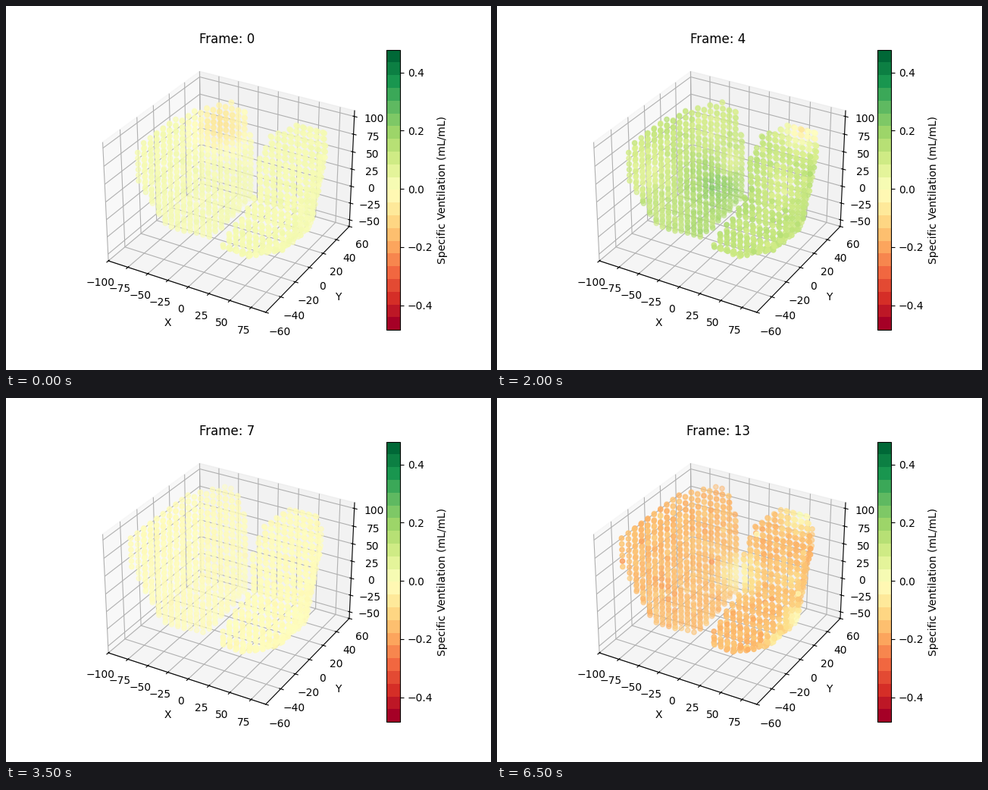
A matplotlib script for the animation above (7 s loop, 640 px wide and 480 px high).

```python
import numpy as np
import matplotlib.pyplot as plt
from matplotlib.animation import FuncAnimation
from matplotlib.cm import ScalarMappable
from matplotlib.colors import Normalize
from matplotlib.path import Path
from mpl_toolkits.mplot3d import proj3d

FRAMES, STEP = 14, 500
HALF = FRAMES // 2
VMIN, VMAX = -0.4844, 0.4781
LAYERS = 2

# Key points of the lung outlines, in pixels from the top left
LEFT = [(170, 189), (216, 154), (249, 135), (297, 124), (315, 136),
        (325, 180), (325, 252), (268, 310), (212, 292), (171, 224)]
RIGHT = [(348, 172), (383, 154), (420, 162), (424, 190), (402, 292),
         (367, 322), (320, 331), (283, 317), (328, 250), (330, 212)]

# Regions that differ from the mean: x, y, radius, amount
INHALE = [(290, 238, 38, .14), (265, 298, 22, .06), (405, 160, 28, -.27),
          (378, 238, 22, -.07), (308, 205, 16, -.14), (198, 212, 32, -.08)]
EXHALE = [(322, 232, 24, .15), (396, 292, 18, .15), (402, 153, 22, .17),
          (370, 322, 14, .14), (385, 240, 20, .06)]

fig = plt.figure(figsize=(6.4, 4.8), dpi=100)
ax = fig.add_subplot(projection="3d")
limits = dict(xlim=(-100, 92), ylim=(-60, 60), zlim=(-60, 108))
ax.set(xlabel="X", ylabel="Y", **limits)
ax.set_xticks(np.arange(-100, 76, 25))
ax.set_yticks(np.arange(-60, 61, 20))
ax.set_zticks(np.arange(-50, 101, 25))
bands = ScalarMappable(Normalize(VMIN, VMAX), plt.get_cmap("RdYlGn", 22))
fig.colorbar(bands, ax=ax, label="Specific Ventilation (mL/mL)")
fig.canvas.draw()


def to_stage(x, y, z):
    """Pixel position of 3D points."""
    u, v, _ = proj3d.proj_transform(x, y, z, ax.get_proj())
    px = ax.transData.transform(np.column_stack([u, v]))
    return px * (1, -1) + (0, 480)


def facing(solid):
    """Keep the few voxel layers that are nearest to the viewer."""
    buried = np.zeros_like(solid)
    k = LAYERS
    buried[:-k, k:, :-k] = solid[k:, :-k, k:]
    return solid & ~buried


def voxels(stretch, shift):
    x, y, z = np.meshgrid(np.arange(-92, 85, 8), np.arange(-52, 53, 8),
                          np.arange(-52, 93, 8), indexing="ij")
    px = to_stage(x.ravel(), y.ravel(), z.ravel())

    def inside(outline):
        shape = (np.array(outline) - (0, 255)) * (1, stretch) + (shift, 255)
        return Path(shape).contains_points(px).reshape(x.shape)

    slope = .35 + .006 * np.maximum(0, z + 20)
    left = inside(LEFT) & (x <= -12) & (y >= -38 + slope * (x + 92))
    right = inside(RIGHT) & (x >= 4) & (y >= -50 + .6 * (z + 40))
    keep = (facing(left) | facing(right)).ravel()
    return np.column_stack([x.ravel(), y.ravel(), z.ravel()])[keep], px[keep]


def bump(px, x, y, r):
    return np.exp(-((px - (x, y)) ** 2).sum(axis=1) / r ** 2)


def values(n, px):
    t = n % HALF / (HALF - 1)
    rng = np.random.default_rng(n)
    if n < HALF:
        grow, regions = t, INHALE
        v = .02 + .165 * grow - .1 * (1 - t) * bump(px, 285, 155, 32)
    else:
        grow, regions = np.sin(t * np.pi / 2), EXHALE
        v = -.01 - .16 * grow + np.zeros(len(px))
    for x, y, r, amount in regions:
        v += amount * grow * bump(px, x, y, r)
    v += (.006 + .01 * grow) * rng.normal(size=len(px))
    odd = rng.random(len(px)) < .008
    return v + odd * grow * rng.uniform(-.08, .14, len(px))


phases = [voxels(1, 0), voxels(1.08, -6)]
clouds = []
for n in range(FRAMES):
    pts, px = phases[n // HALF]
    clouds.append(ax.scatter(*pts.T, c=values(n, px), cmap="RdYlGn",
                             vmin=VMIN, vmax=VMAX, visible=False))
ax.set(**limits)


def draw(n):
    for i, cloud in enumerate(clouds):
        cloud.set_visible(i == n)
    ax.set_title(f"Frame: {n}")
    return clouds


anim = FuncAnimation(fig, draw, frames=FRAMES, interval=STEP,
                     repeat=True, repeat_delay=0, blit=False)
plt.show()
```
